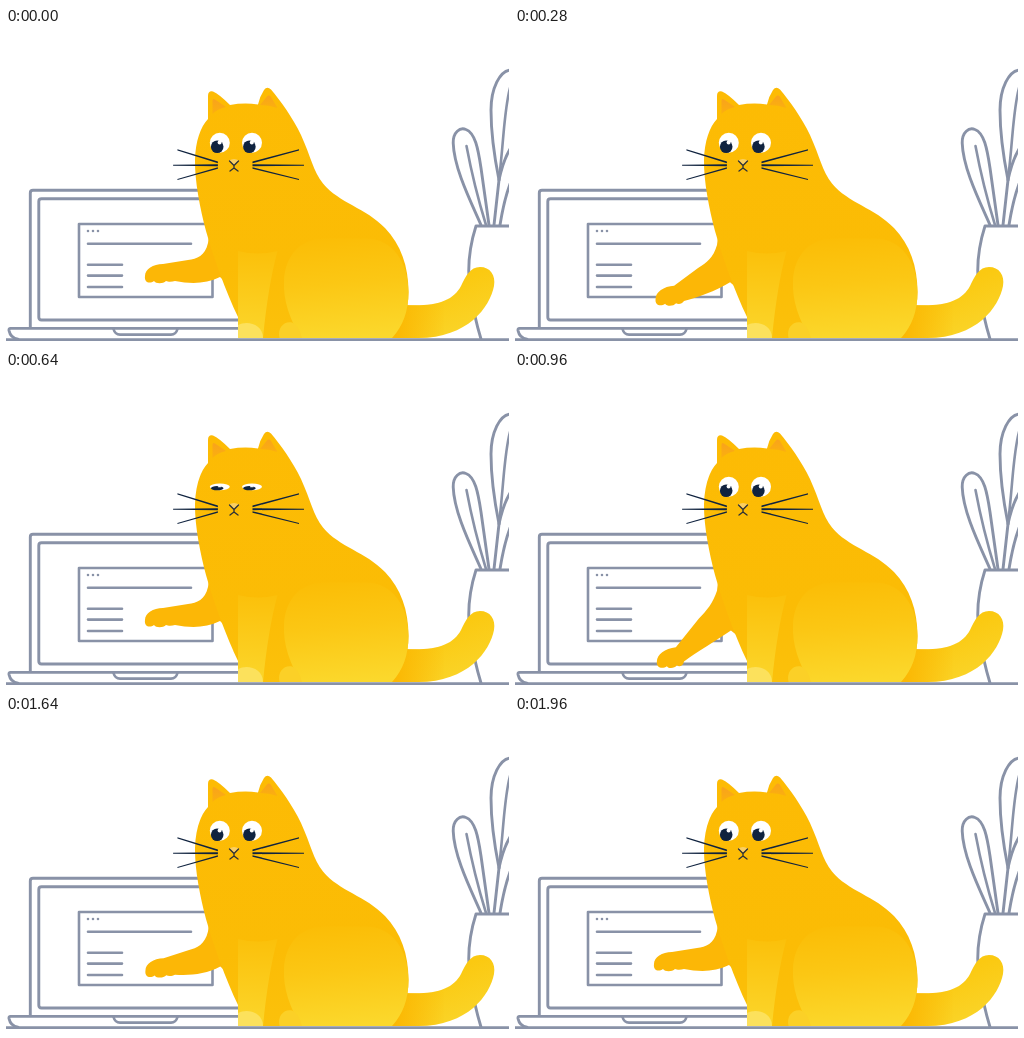
An HTML page for the animation above (2.4 s loop, 503 px wide and 316 px high).

```html
<!DOCTYPE html>
<html lang="en">
<head>
<meta charset="utf-8">
<title>Cat at a laptop</title>
<style>
  html, body { margin: 0; width: 100%; height: 100%; overflow: hidden; background: #fff; }
  svg { display: block; width: 503px; height: 316px; }
  .line { fill: none; stroke: #8992a7; stroke-width: 2.9; stroke-linecap: round; stroke-linejoin: round; }
  .thin { stroke-width: 2.6; }
  .ink { fill: #10233f; }
</style>
</head>
<body>
<svg viewBox="0 0 503 316">
  <defs>
    <linearGradient id="body" gradientUnits="userSpaceOnUse" x1="250" y1="60" x2="275" y2="310">
      <stop offset="0" stop-color="#fdbb04"/>
      <stop offset=".7" stop-color="#fbbc05"/>
      <stop offset="1" stop-color="#fbc10b"/>
    </linearGradient>
    <linearGradient id="thigh" gradientUnits="userSpaceOnUse" x1="335" y1="208" x2="345" y2="310">
      <stop offset="0" stop-color="#fbbd06"/>
      <stop offset=".45" stop-color="#fbc714"/>
      <stop offset="1" stop-color="#fbd82c"/>
    </linearGradient>
    <linearGradient id="leg" gradientUnits="userSpaceOnUse" x1="250" y1="222" x2="246" y2="310">
      <stop offset="0" stop-color="#fbc00a"/>
      <stop offset="1" stop-color="#fbd62b"/>
    </linearGradient>
    <linearGradient id="tail" gradientUnits="userSpaceOnUse" x1="425" y1="262" x2="442" y2="306">
      <stop offset="0" stop-color="#fbc911"/>
      <stop offset="1" stop-color="#fad326"/>
    </linearGradient>
    <linearGradient id="shade" gradientUnits="userSpaceOnUse" x1="390" y1="0" x2="440" y2="0">
      <stop offset="0" stop-color="#fbb804"/>
      <stop offset="1" stop-color="#fbb804" stop-opacity="0"/>
    </linearGradient>
    <linearGradient id="ear" x1="0" y1="0" x2="0" y2="1">
      <stop offset="0" stop-color="#f9a31c"/>
      <stop offset="1" stop-color="#fbb00e"/>
    </linearGradient>
    <g id="eye">
      <circle r="10" fill="#fff"/>
      <circle class="ink" cx="-2.6" cy="4" r="6.3"/>
      <circle cx="-.2" cy="-.4" r="2" fill="#fff"/>
    </g>
    <g id="whiskers" class="ink">
      <path d="M18.500 -3.600L65 -15.900V-14.700L18.500 -2Z"/>
      <path d="M18.500 -1L70 -.5V.5L18.500 1Z"/>
      <path d="M18.500 2L65 13.700V14.900L18.500 3.600Z"/>
    </g>
  </defs>

  <g class="line">
    <path d="M24.300 299V165Q24.300 162.300 27 162.300H220"/>
    <path d="M240 292H35.500Q32.800 292 32.800 289.300V173.500Q32.800 170.800 35.500 170.800H220"/>
    <path d="M240 300.400H4.500Q2.800 300.400 3 302.500Q4.500 310 12 311.300"/>
    <path class="thin" d="M107.500 301Q109 306.600 114 306.600H165Q170 306.600 171.500 301"/>
    <path class="thin" d="M73 196H206.500V269H73ZM82 215.800H185M82 236.800H116M82 247.600H116M82 259H116"/>
    <path class="thin" d="M82 203h.01M87 203h.01M92 203h.01"/>
    <path d="M504 198H470C463 220 460.500 240 464.500 264Q468 288 475 311"/>
    <path d="M475 197C464 172 448 140 447.200 115C447 104 454 99 460 101.500C469 105 472 120 475 140L483 197"/>
    <path class="thin" d="M460.500 118Q468 158 480 197"/>
    <path d="M504 42C494 43 485 60 485 82Q485 112 493 152"/>
    <path class="thin" d="M504 60C498 82 498 110 493 152"/>
    <path d="M488 197L493 152Q497 133 504 121M494 197Q498 172 504 156"/>
    <path d="M0 311.600H503"/>
  </g>

  <path id="arm" fill="#fcb706"/>

  <path fill="url(#tail)" d="M380 310L398 277C430 279 447 273 455 258C460 248 464 239 474 239C484 239 490 247 488 258C484 279 462 310 412 310Z"/>
  <path fill="url(#shade)" d="M380 310L398 277C415 278 428 277 438 273V307Q426 310 412 310Z"/>

  <path fill="url(#body)" d="M232 310V289C220 264 207 228 200 203C194 180 188.700 153 189 132C189.500 113 194.500 99 202 91V68Q202 62.500 207 63.500Q213 66 224 77Q238 74.500 252 76.500Q254 68 258 62Q261 58 265 61.500C274 72 287 90 295 107C305 129 307 143 317 155.500C333 175 360 180 379 200C395 217 402.500 238 402.500 264Q402.500 292 386 310Z"/>
  <path fill="url(#leg)" d="M232 223Q252 228 271.500 223Q262 258 257 310H232Z"/>
  <path fill="url(#thigh)" d="M295 310C284 292 277 272 278 253C279 226 296 210.500 318 210.500H360C386 210.500 402.500 234 402.500 264Q402.500 292 386 310Z"/>
  <path fill="#fce15c" d="M232 310V297C241 292 257 296 257 310Z"/>
  <path fill="#fbd027" d="M273.500 310C271 299 279 292.500 286 294.500Q293 297 296 310Z"/>

  <path fill="url(#ear)" d="M206.500 86V73Q206.500 70 209 71.500L220 79Q211 81 206.500 86Z"/>
  <path fill="url(#ear)" d="M254 77L261 68.500Q263 66.500 265 69L271.500 80Q263 77 254 77Z"/>

  <g id="eyes">
    <use href="#eye" x="213.800"/>
    <use href="#eye" x="246"/>
  </g>

  <path fill="#fbcf62" d="M223 132.500Q228 129.500 233 132.500L228 137.500Z"/>
  <path fill="none" stroke="#2b3038" stroke-width="1.300" stroke-linecap="round" d="M223.500 133L228 137.500L232.500 133M228 137.500V140L224 143M228 140L232 143"/>
  <use href="#whiskers" transform="translate(228 137.200)"/>
  <use href="#whiskers" transform="translate(228 137.200) scale(-.87 1)"/>
</svg>
<script>
  const LOOP = 2400, STEP = 40;
  const TAPS = [0, 840, 1600], TAP = 360;
  const BLINK = 480, BLINK_LEN = 240;

  const raised = "M204 200L202 215C199 228 191 231 182 232L157 236C147 236 139 241 139 248C138 255 144 256 148 253C150 256 157 256 160 253C162 254 166 254 169 253C185 256 200 256 214 249L228 262L232 220Z";
  const lowered = "M204 200L202 219C198 231 192 239 184 247L161 277C150 278 142 285 142 291C141 298 148 299 152 296C154 299 160 298 162 295C164 297 168 296 169 291C182 281 200 270 216 259L230 270L232 220Z";
  const target = lowered.match(/\d+/g);

  const arm = document.getElementById("arm");
  const eyes = document.getElementById("eyes");

  // Eased 0 -> 1 -> 0 over one span, 0 elsewhere
  function pulse(t, start, length) {
    const u = (t - start) / length;
    return u > 0 && u < 1 ? Math.sin(Math.PI * u) ** 2 : 0;
  }

  function mixPath(k) {
    let i = 0;
    return raised.replace(/\d+/g, n => (+n + (target[i++] - n) * k).toFixed(2));
  }

  function draw(now) {
    const t = Math.floor((now % LOOP) / STEP) * STEP;
    const press = TAPS.reduce((sum, start) => sum + pulse(t, start, TAP), 0);
    const open = 1 - 0.88 * pulse(t, BLINK, BLINK_LEN);
    arm.setAttribute("d", mixPath(press * 1.28));
    eyes.setAttribute("transform", `translate(0 114.8) scale(1 ${open})`);
  }

  function tick() {
    draw(performance.now());
    requestAnimationFrame(tick);
  }
  tick();
</script>
</body>
</html>
```
